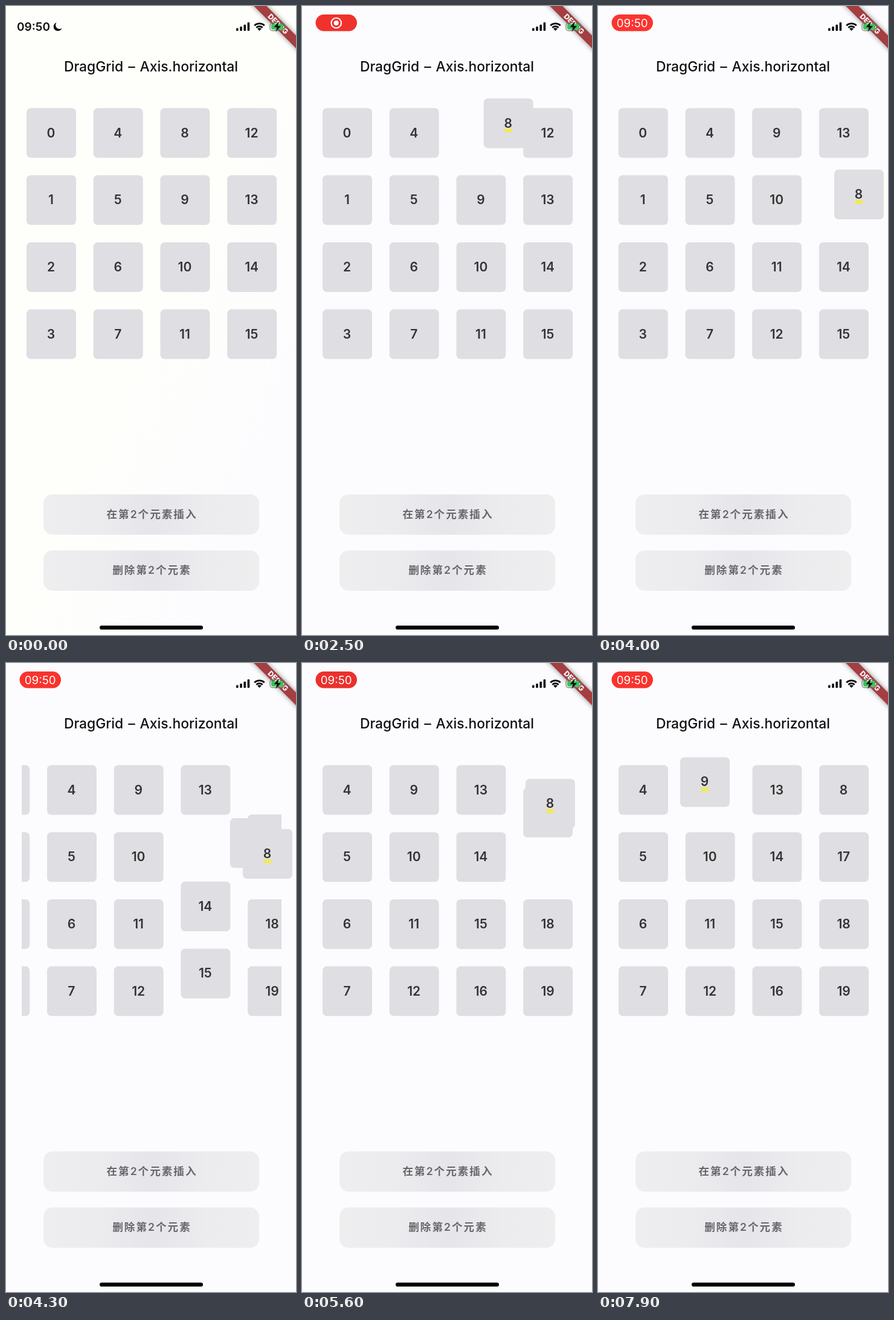
These frames come from a looping animation (480x1038 px, 8 s). An HTML page:

```html
<!DOCTYPE html>
<html lang="zh">
<head>
<meta charset="utf-8">
<title>DragGrid</title>
<style>
html, body { margin: 0; width: 100%; height: 100%; overflow: hidden; background: #fcfcff; }
svg { display: block; width: 100%; height: 100%; }
text { font-family: Inter, "Noto Sans CJK SC", "Noto Sans CJK", sans-serif; text-anchor: middle; }
.title { font-size: 22.8px; font-weight: 500; word-spacing: 2px; fill: #111; }
.num { font-size: 21px; font-weight: 600; fill: #333; }
.btn { font-size: 17.6px; font-weight: 600; letter-spacing: 2px; fill: #68686b; }
</style>
</head>
<body>
<svg viewBox="0 0 480 1038" preserveAspectRatio="none">
  <defs>
    <linearGradient id="bar">
      <stop offset="0" stop-color="#eeeeef"/>
      <stop offset=".25" stop-color="#ecebee"/>
      <stop offset=".5" stop-color="#e6e5ea"/>
      <stop offset=".75" stop-color="#ecebee"/>
      <stop offset="1" stop-color="#eeeeef"/>
    </linearGradient>
    <linearGradient id="warm" x2="1" y2="1">
      <stop offset=".5" stop-color="#fefefb"/>
      <stop offset=".85" stop-color="#fcfcff"/>
    </linearGradient>
    <filter id="blur" x="-20%" y="-120%" width="140%" height="340%"><feGaussianBlur stdDeviation="4.5"/></filter>
    <clipPath id="view"><rect x="26" y="150" width="430" height="450"/></clipPath>
  </defs>

  <rect width="480" height="1038" fill="#fcfcff"/>
  <rect id="tint" width="480" height="1038" fill="url(#warm)"/>

  <text class="title" x="240" y="108">DragGrid – Axis.horizontal</text>

  <g id="grid" clip-path="url(#view)"></g>

  <rect x="62" y="806" width="357" height="66.5" rx="15" fill="url(#bar)"/>
  <text class="btn" x="241.5" y="844.5">在第2个元素插入</text>
  <rect x="62" y="898.5" width="357" height="66.5" rx="15" fill="url(#bar)"/>
  <text class="btn" x="241.5" y="936.5">删除第2个元素</text>

  <g id="drag"></g>

  <g transform="translate(480 0) rotate(45)">
    <rect x="-60" y="34.5" width="120" height="14.8" opacity=".45" filter="url(#blur)"/>
    <rect x="-60" y="34.5" width="120" height="14.8" fill="#a53e40"/>
    <text y="46.3" font-size="12" font-weight="800" fill="#fff">DEBUG</text>
  </g>

  <g id="clock">
    <text x="45.5" y="41" font-size="19" font-weight="600" fill="#111">09:50</text>
    <path d="M83.5 27.2A7.2 7.2 0 1 0 92.6 36.6A6.6 6.6 0 0 1 83.5 27.2Z" fill="#111"/>
  </g>
  <g id="pill">
    <rect id="pillBox" x="22.5" y="14" width="68.5" height="27.5" rx="13.7"/>
    <g id="rec">
      <circle cx="56.7" cy="28" r="8.3" fill="none" stroke="#fff" stroke-width="2"/>
      <circle cx="56.7" cy="28" r="4" fill="#fff"/>
    </g>
    <text id="recTime" x="56.7" y="34.5" font-size="18.8" fill="#fff">09:50</text>
  </g>

  <g fill="#0c0c0c">
    <rect x="381" y="36.5" width="3.6" height="4.5" rx="1"/>
    <rect x="387.2" y="34" width="3.6" height="7" rx="1"/>
    <rect x="393.4" y="30.7" width="3.6" height="10.3" rx="1"/>
    <rect x="399.6" y="27" width="3.6" height="14" rx="1"/>
    <path d="M419.5 41l-3.4-3.4a4.9 4.9 0 0 1 6.8 0z"/>
  </g>
  <g fill="none" stroke="#0c0c0c" stroke-width="2.7">
    <path d="M411.2 32.2a12 12 0 0 1 16.6 0"/>
    <path d="M414.3 35.7a7.5 7.5 0 0 1 10.4 0"/>
  </g>
  <rect x="437" y="27.7" width="24" height="13" rx="4" fill="none" stroke="#777" stroke-width="1.2"/>
  <rect x="439" y="29.7" width="20" height="9" rx="2.2" fill="#35c759"/>
  <rect x="462.5" y="32" width="1.8" height="4.5" rx=".9" fill="#777"/>
  <path d="M451.5 26l-8 9h5l-2 7.5 8.5-9.5h-5.2z" fill="#0c0c0c"/>

  <rect x="155" y="1022.5" width="171" height="6.5" rx="3.2"/>
</svg>
<script>
const LOOP = 8000, STEP = 110.7, SIZE = 82, SHIFT = 300;
const $ = id => document.getElementById(id);
const clamp = v => Math.max(0, Math.min(1, v));
const ramp = (t, from, to) => clamp((t - from) / (to - from));
const show = (el, on) => el.setAttribute('opacity', on);
const place = (el, x, y) => el.setAttribute('transform', `translate(${x.toFixed(2)} ${y.toFixed(2)})`);
const home = i => [34 + Math.floor(i / 4) * STEP, 168.5 + (i % 4) * STEP];

// [time, old index, new index]: the slot follows the dragged tile's centre
const moves = [[2700, 8, 12], [3560, 12, 13], [4222, 13, 17], [5500, 17, 16]];

// Points are [time, x, y]; the tile is dropped at `end`.
const drags = [
  { n: 8, end: 6000, path: [[2050, 255.4, 168.5], [2500, 300.5, 152.5], [2900, 346, 172], [3300, 362, 206],
    [3650, 376, 250], [4000, 391, 270], [4300, 392, 274], [4600, 387, 277], [4900, 370, 278],
    [5300, 368, 236], [5650, 370, 186], [6000, 368, 174]] },
  { n: 9, end: LOOP, path: [[7500, 144.7, 168.5], [7900, 136, 155.5], [8000, 135, 154]] }
];

function tile(n, parent, held) {
  const g = document.createElementNS('http://www.w3.org/2000/svg', 'g');
  const mid = SIZE / 2;
  g.innerHTML = `<rect width="${SIZE}" height="${SIZE}" rx="7" fill="#dfdee2"/>` +
    (held ? `<path d="M${mid - 6.5} 51.5h13m-13 3.2h13" stroke="#f8f020" stroke-width="2.2"/>` : '') +
    `<text class="num" x="${mid - .5}" y="48">${n}</text>`;
  parent.append(g);
  return g;
}

const tiles = Array.from({ length: 20 }, (_, n) => tile(n, $('grid')));
for (const d of drags) d.el = tile(d.n, $('drag'), true);

// Smooth curve through the points (cubic Hermite)
function along(path, t) {
  let i = 0;
  while (i < path.length - 2 && t > path[i + 1][0]) i++;
  const a = path[i], b = path[i + 1], h = b[0] - a[0], u = clamp((t - a[0]) / h);
  const slope = (k, c) => {
    const p = path[Math.max(0, k - 1)], q = path[Math.min(path.length - 1, k + 1)];
    return (q[c] - p[c]) / (q[0] - p[0]) * h;
  };
  const u2 = u * u, u3 = u2 * u;
  return [1, 2].map(c => (2 * u3 - 3 * u2 + 1) * a[c] + (u3 - 2 * u2 + u) * slope(i, c) +
    (3 * u2 - 2 * u3) * b[c] + (u3 - u2) * slope(i + 1, c));
}

function layout(t) {
  const order = tiles.map((_, i) => i);
  const pos = order.map(home);
  for (const [start, from, to] of moves) {
    if (t < start) break;
    order.splice(to, 0, order.splice(from, 1)[0]);
    const k = ramp(t, start, start + SHIFT);
    order.forEach((n, i) => {
      const target = home(i);
      pos[n] = pos[n].map((v, c) => v + (target[c] - v) * k);
    });
  }
  return pos;
}

function draw(t) {
  const scroll = STEP * ramp(t, 4000, 4434);
  layout(t).forEach(([x, y], n) => place(tiles[n], x - scroll, y));
  tiles.forEach(el => show(el, 1));
  for (const d of drags) {
    const held = t >= d.path[0][0] && t < d.end;
    show(d.el, held ? 1 : 0);
    if (held) {
      show(tiles[d.n], 0);
      place(d.el, ...along(d.path, t));
    }
  }

  const recording = ramp(t, 500, 650);
  show($('tint'), t < 500 ? 1 : 0);
  show($('clock'), 1 - recording);
  show($('pill'), recording);
  const dim = (1 + Math.cos((t - 3100) / 1000 * Math.PI)) / 2;
  $('pillBox').setAttribute('fill', `rgb(${252 - 36 * dim},${52 - 6 * dim},${46 - 4 * dim})`);
  const swap = ramp(t, 3000, 3400);
  show($('rec'), 1 - swap);
  show($('recTime'), swap);
}

const begin = performance.now();
function tick() {
  draw((performance.now() - begin) % LOOP);
  requestAnimationFrame(tick);
}
tick();
</script>
</body>
</html>
```
